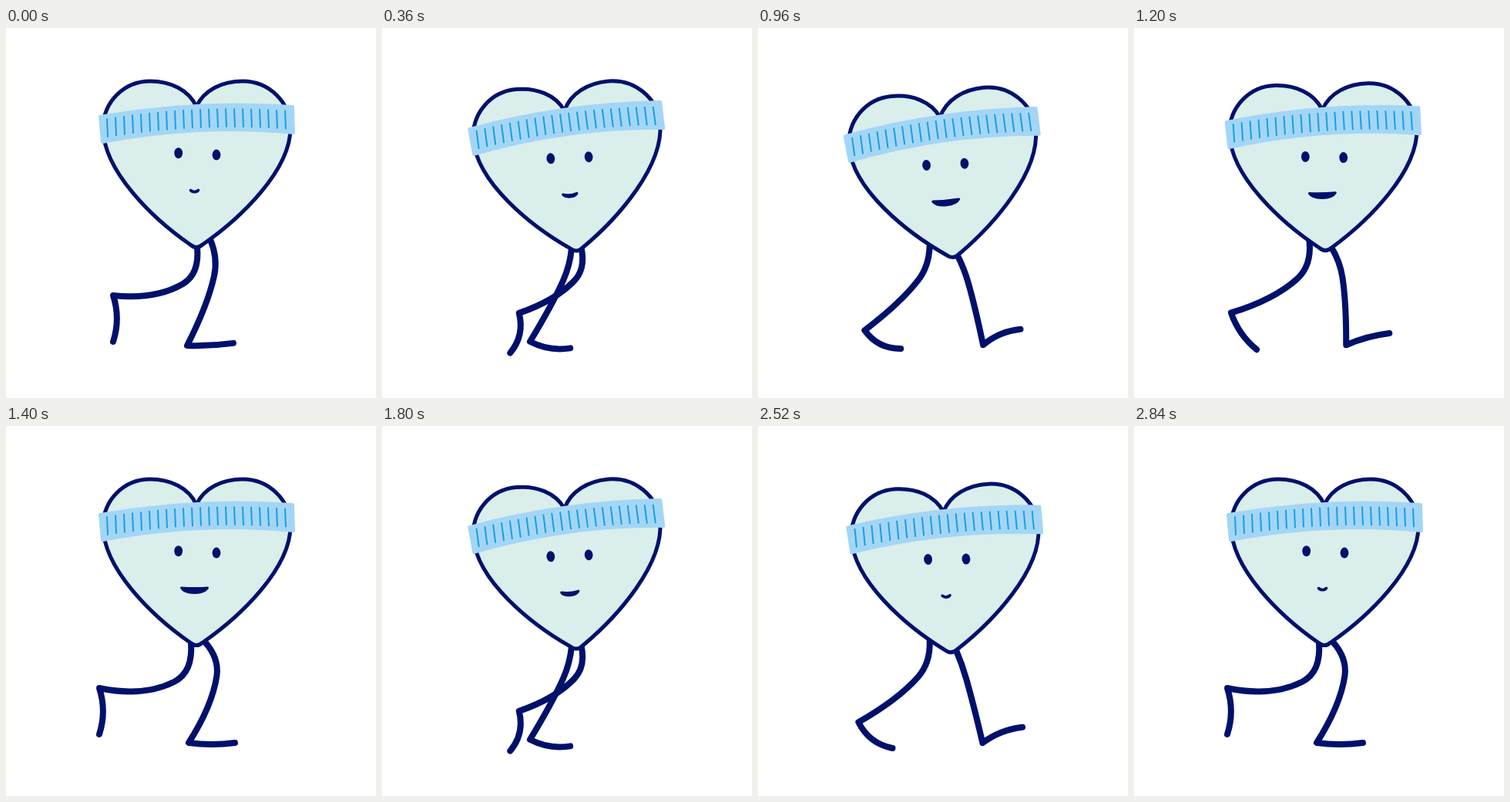
These frames come from a looping animation (480 by 480 pixels, 2.88 s). An HTML page:

```html
<!DOCTYPE html>
<html lang="en">
<head>
<meta charset="utf-8">
<title>Walking heart</title>
<style>
  html, body { margin: 0; width: 100%; height: 100%; overflow: hidden; background: #fff; }
  svg { display: block; width: 100%; height: 100%; }
  .line { fill: none; stroke: #00116b; stroke-linecap: round; stroke-linejoin: round; }
</style>
</head>
<body>
<svg viewBox="0 0 480 480">
  <path id="swingLeg" class="line" stroke-width="8"/>
  <path id="stanceLeg" class="line" stroke-width="8"/>
  <!-- The origin of the body is the tip of the heart -->
  <g id="body">
    <path class="line" stroke-width="5" style="fill:#daeeec" d="M0 -183C-10 -205 -34 -216 -60 -216C-94 -216 -121 -189 -121 -155C-121 -100 -57 -38 -8 -4Q0 3 8 -4C57 -38 122 -100 122 -155C122 -189 94 -216 60 -216C34 -216 10 -205 0 -183Z"/>
    <path fill="#a3d6f6" stroke="#a3d6f6" stroke-width="4" stroke-linejoin="round" d="M-125 -170Q0 -192 125 -183L126 -149Q3 -161 -122 -137Z"/>
    <path id="ticks" fill="none" stroke="#1a9fe0" stroke-width="2"/>
    <g fill="#00116b">
      <ellipse cx="-23.3" cy="-122.7" rx="5.4" ry="7"/>
      <ellipse cx="26" cy="-120.4" rx="5.4" ry="7"/>
    </g>
    <path id="mouth" class="line" style="fill:#00116b"/>
  </g>
</svg>
<script>
const FRAME_MS = 40, STEP_FRAMES = 36;
const el = id => document.getElementById(id);
const mix = (a, b, u) => a + (b - a) * u;
const hump = u => Math.sin(Math.PI * u) ** 2;
const smoothstep = u => {
  u = Math.min(1, Math.max(0, u));
  return u * u * (3 - 2 * u);
};

// Five evenly spaced poses per step; hip is measured sideways from the tip
const swing = {
  hip: [1, 6, 5, 6, 10], heelX: [139, 176, 260, 293, 237], heelY: [347, 369, 407, 411, 411],
  bend: [32, 23, 18, 2, 23], footAngle: [90, 104, -6, -22, 0]
};
const stance = {
  hip: [18, -6, -24, -28, -7], heelX: [235, 193, 162, 132, 121], heelY: [412, 407, 397, 387, 340],
  bend: [15, 7, 10, 18, 36], footAngle: [-3, 9, 18, 34, 90]
};

// Smooth curve through evenly spaced values, u from 0 to 1
function glide(values, u) {
  const last = values.length - 1, i = Math.min(last - 1, Math.floor(u * last)), t = u * last - i;
  const slope = k => {
    const a = Math.max(k - 1, 0), b = Math.min(k + 1, last);
    return (values[b] - values[a]) / (b - a);
  };
  return mix(values[i], values[i + 1], t * t * (3 - 2 * t))
    + t * (1 - t) * (slope(i) * (1 - t) - slope(i + 1) * t);
}

function bodyPose(u) {
  const lean = hump(u + 0.03 * Math.sin(Math.PI * u));
  return {
    lean,
    x: 247 + 10 * lean,
    y: 285 + 15.5 * hump(u ** 1.5) + 2 * Math.sin(2 * Math.PI * u),
    tilt: -8.6 * lean
  };
}

function legPath(leg, u, body) {
  const at = name => glide(leg[name], u);
  const hip = at('hip'), bend = at('bend'), ax = at('heelX'), ay = at('heelY');
  const tilt = body.tilt * Math.PI / 180, rise = -0.6 * Math.abs(hip);
  const hx = body.x + hip * Math.cos(tilt) - rise * Math.sin(tilt);
  const hy = body.y + hip * Math.sin(tilt) + rise * Math.cos(tilt);

  // The knee sits a third of the way down, pushed out by the bend
  const reach = Math.hypot(ax - hx, ay - hy);
  const dx = (ax - hx) / reach, dy = (ay - hy) / reach;
  const kx = hx + 0.32 * reach * dx + bend * dy;
  const ky = hy + 0.32 * reach * dy - bend * dx;
  const thigh = Math.hypot(kx - hx, ky - hy), up = 0.5 * thigh, down = 0.8 * thigh;

  const a = at('footAngle') * Math.PI / 180, foot = 60 - 12 * body.lean;
  const fx = Math.cos(a), fy = Math.sin(a), arch = -14 * Math.sin(2.3 * a + 0.3);
  return `M${hx} ${hy}Q${kx - up * dx} ${ky - up * dy} ${kx} ${ky}`
    + `Q${kx + down * dx} ${ky + down * dy} ${ax} ${ay}`
    + `q${foot / 2 * fx + arch * fy} ${foot / 2 * fy - arch * fx} ${foot * fx} ${foot * fy}`;
}

function drawMouth(frame) {
  const open = smoothstep((frame - 2) / 18) - smoothstep((frame - 36) / 18);
  const w = mix(5, 17, open), y = mix(-74.5, -75, open);
  const inset = mix(2, 5, open), depth = mix(3, 8.5, open);
  el('mouth').setAttribute('d', `M${-2.5 - w} ${y}q${w} ${mix(4, 1, open)} ${2 * w} 0`
    + `c${-inset} ${depth} ${inset - 2 * w} ${depth} ${-2 * w} 0Z`);
  el('mouth').setAttribute('stroke-width', mix(3.6, 3, open));
}

el('ticks').setAttribute('d', Array.from({ length: 22 }, (_, i) => {
  const u = i / 21, y = mix(mix(-155.5, -174, u), mix(-174, -166, u), u);
  return `M${-116 + 11 * i} ${y - 12.2}l1 24.4`;
}).join(''));

function draw() {
  const frame = Math.floor(performance.now() / FRAME_MS) % (2 * STEP_FRAMES);
  const u = frame % STEP_FRAMES / (STEP_FRAMES - 1);
  const body = bodyPose(u);
  el('body').setAttribute('transform', `translate(${body.x} ${body.y}) rotate(${body.tilt})`);
  el('swingLeg').setAttribute('d', legPath(swing, u, body));
  el('stanceLeg').setAttribute('d', legPath(stance, u, body));
  drawMouth(frame);
  requestAnimationFrame(draw);
}
draw();
</script>
</body>
</html>
```
